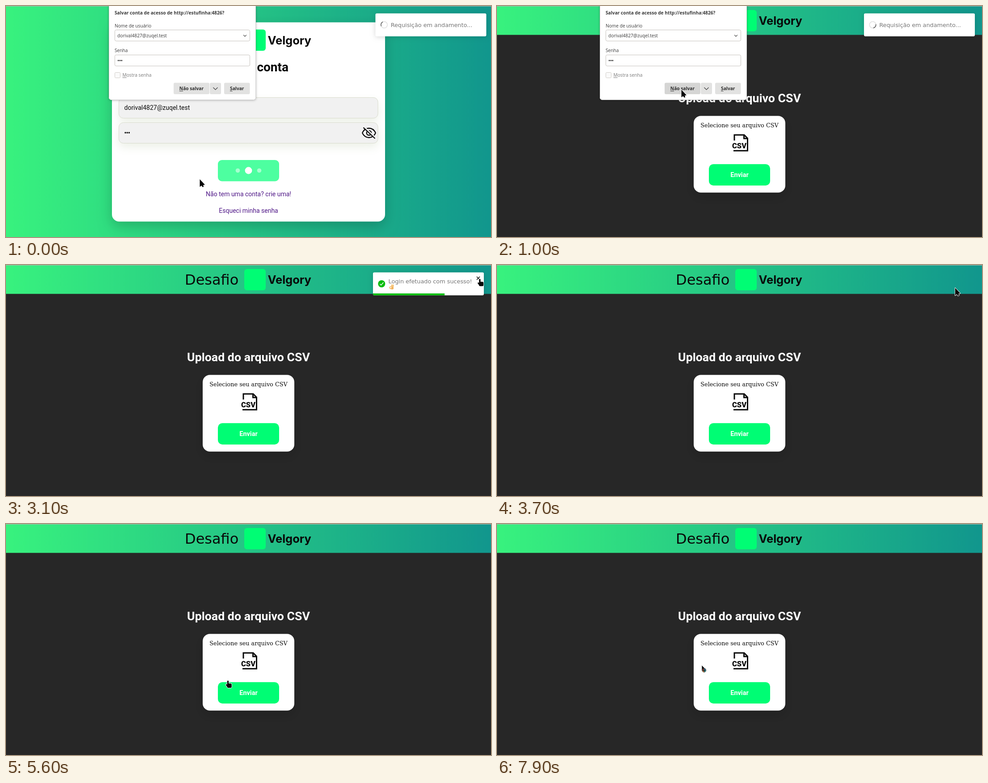
An HTML page with a canvas that plays this animation: 1085x516 px, repeating every 8000 ms.

```html
<!DOCTYPE html>
<html lang="pt-BR">
<head>
<meta charset="utf-8">
<title>Login e upload</title>
<style>
  html, body { margin: 0; width: 100%; height: 100%; overflow: hidden; background: #272727; }
  canvas { display: block; }
</style>
</head>
<body>
<canvas id="stage" width="1085" height="516"></canvas>
<script>
const ctx = document.getElementById('stage').getContext('2d');
const W = 1085, H = 516, MID = W / 2, LOOP = 8000;
const ROBOTO = 'Roboto, sans-serif';
const SANS = '12.8px "DejaVu Sans", sans-serif';
const UI = '10.2px "Open Sans", sans-serif', UI_BOLD = 'bold ' + UI;
const GREEN = '#00fd74', OK = '#07bc0c', INK = '#3a3a3a', BLACK = '#080808';
const EMAIL = 'dorival4827@zuqel.test';

const PAGE_AT = 950, DIALOG_END = 1200, SUCCESS_AT = 1320;
const HOVER_AT = 3090, CLOSE_AT = 3390, BUSY_AT = 7850;

// pointer moves: start time, end time, destination
const HOME = { x: 433, y: 387 };
const MOVES = [
  [200, 800, 412, 187],
  [1300, 1900, 494, 236],
  [1900, 2700, 1044, 95],
  [2700, 3080, 1054, 31],
  [3600, 4300, 529, 387],
  [4600, 5300, 470, 371],
  [5400, 5900, 528, 311],
  [6000, 6300, 476, 324],
  [6700, 7300, 458, 316]
];

const clamp = v => Math.max(0, Math.min(1, v));
const mix = (a, b, k) => a + (b - a) * k;
const smooth = k => k * k * (3 - 2 * k);

function pointerAt(t) {
  let { x, y } = HOME;
  for (const [from, to, endX, endY] of MOVES) {
    const k = smooth(clamp((t - from) / (to - from)));
    x = mix(x, endX, k);
    y = mix(y, endY, k);
  }
  return { x, y };
}

function box(x, y, w, h, r, fill, stroke) {
  ctx.beginPath();
  ctx.roundRect(x, y, w, h, r);
  if (fill) { ctx.fillStyle = fill; ctx.fill(); }
  if (stroke) { ctx.strokeStyle = stroke; ctx.lineWidth = 1; ctx.stroke(); }
}

function shadowBox(color, blur, dy, ...args) {
  ctx.save();
  ctx.shadowColor = color;
  ctx.shadowBlur = blur;
  ctx.shadowOffsetY = dy;
  box(...args);
  ctx.restore();
}

function text(str, x, y, font, color, align = 'left') {
  ctx.font = font;
  ctx.fillStyle = color;
  ctx.textAlign = align;
  ctx.fillText(str, x, y);
}

function dot(x, y, r, fill) {
  ctx.beginPath();
  ctx.arc(x, y, r, 0, 7);
  ctx.fillStyle = fill;
  ctx.fill();
}

function ring(x, y, r, color, width, from = 0, to = 7) {
  ctx.beginPath();
  ctx.arc(x, y, r, from, to);
  ctx.strokeStyle = color;
  ctx.lineWidth = width;
  ctx.stroke();
}

function line(color, width, ...p) {
  ctx.beginPath();
  for (let i = 0; i < p.length; i += 2) ctx.lineTo(p[i], p[i + 1]);
  ctx.strokeStyle = color;
  ctx.lineWidth = width;
  ctx.stroke();
}

function bullets(x, y, step, r, color) {
  for (let i = 0; i < 3; i++) dot(x + i * step, y, r, color);
}

function gradient(h) {
  const g = ctx.createLinearGradient(0, 0, W, 0);
  g.addColorStop(0, '#38f27e');
  g.addColorStop(1, '#11968d');
  ctx.fillStyle = g;
  ctx.fillRect(0, 0, W, h);
}

function brand(y) {
  text('Desafio', 400, y + 34.5, '32px "DejaVu Sans", sans-serif', BLACK);
  box(533, y, 48, 47.5, 6, GREEN);
  text('Velgory', 585.5, y + 33, 'bold 25.5px Inter, sans-serif', BLACK);
}

function eye(x, y) {
  ctx.save();
  ctx.translate(x, y);
  for (const side of [-1, 1]) {
    ctx.beginPath();
    ctx.moveTo(-15, 0);
    ctx.bezierCurveTo(-8, 14 * side, 8, 14 * side, 15, 0);
    ctx.strokeStyle = BLACK;
    ctx.lineWidth = 2.3;
    ctx.stroke();
  }
  ring(0, 0, 5.2, BLACK, 2.3);
  line('#f1f1f1', 2.6, -10.5, -13.5, 15, 11);
  line(BLACK, 2.3, -12.5, -12, 13.5, 12.5);
  ctx.restore();
}

function loginPage(t) {
  gradient(H);
  shadowBox('rgba(0,0,0,.2)', 30, 10, 237, 36.5, 611, 445, 16, '#fff');
  brand(52.5);
  text('conta', 632, 146, 'bold 28px ' + ROBOTO, BLACK, 'right');

  for (const y of [204.5, 260.5])
    shadowBox('rgba(110,140,70,.13)', 20, 9, 252.5, y, 579.5, 46, 10, '#f1f1f1');
  for (const y of [204.5, 260.5]) box(252.5, y, 579.5, 46, 10, '#f1f1f1', '#d9dccd');
  text(EMAIL, 264.5, 232, '14px ' + ROBOTO, BLACK);
  bullets(267, 283, 4.2, 1.7, BLACK);
  eye(812, 283.5);

  box(474, 344, 137, 47.5, 9, '#4dffa0');
  const beat = Math.abs((t / 400) % 2 - 1);
  for (let i = -1; i <= 1; i++) {
    const k = i ? 1 - beat : beat;
    dot(MID + i * 24, 367.5, mix(4.8, 7.9, k), `rgba(255,255,255,${mix(.5, 1, k)})`);
  }
  text('Não tem uma conta? crie uma!', MID, 425, '14px ' + ROBOTO, '#4f1787', 'center');
  text('Esqueci minha senha', MID, 462, '14px ' + ROBOTO, '#4f1787', 'center');
}

function csvIcon(x, y) {
  ctx.save();
  ctx.translate(x, y);
  line(BLACK, 3, 5, 14, 5, 1.5, 27, 1.5, 34.5, 9, 34.5, 36.7, 3, 36.7);
  line(BLACK, 3, 26.5, 1.5, 26.5, 9.5, 34.5, 9.5);
  text('CSV', 0, 31.5, '900 16.5px ' + ROBOTO, BLACK);
  ctx.restore();
}

function uploadPage() {
  ctx.fillStyle = '#272727';
  ctx.fillRect(0, 0, W, H);
  gradient(64.5);
  brand(9);
  text('Upload do arquivo CSV', MID, 214.5, 'bold 26.7px ' + ROBOTO, '#fff', 'center');
  shadowBox('rgba(0,0,0,.14)', 24, 10, 440, 245.5, 205, 171.3, 16, '#fff');
  text('Selecione seu arquivo CSV', MID, 271.3, '12.8px "DejaVu Serif", serif', BLACK, 'center');
  csvIcon(526, 286.5);
  box(474, 353.3, 137, 47.7, 10, GREEN);
  text('Enviar', MID, 382, 'bold 14.5px ' + ROBOTO, '#fff', 'center');
}

function spinner(t) {
  const a = (200 + t / 650 * 360) * Math.PI / 180;
  ring(840.5, 42, 7.2, '#e0e0e0', 1.6);
  ring(840.5, 42, 7.2, '#616161', 1.6, a - .8, a + .8);
}

function okHand(x, y) {
  for (let i = 0; i < 3; i++)
    line('#f5bd6b', 1.8, x + 2.5 + i * 1.4, y, x + 1.6 + i * 2.2, y - 7);
  box(x, y - 1, 6.2, 5, 2, '#f2b35c');
  ring(x, y, 2.3, '#f2b35c', 1.7);
  dot(x, y, 1.3, '#fff');
}

function successContent(t) {
  ctx.save();
  ctx.translate(840.3, 42);
  const s = mix(.3, 1, clamp((t - SUCCESS_AT) / 300));
  ctx.scale(s, s);
  dot(0, 0, 8, OK);
  line('#fff', 1.5, -3.8, .3, -1.2, 3, 4, -3);
  ctx.restore();

  text('Login efetuado com sucesso!', 855.5, 41, SANS, '#757575');
  okHand(860.8, 50.6);
  const cross = t > HOVER_AT - 40 ? '#111' : '#a5a5a5';
  for (const d of [-3.5, 3.5]) line(cross, 1.6, 1056.5 - d, 26, 1056.5 + d, 33);

  // the countdown stops while the pointer rests on the toast
  const left = 1 - (Math.min(t, HOVER_AT) - SUCCESS_AT) / 5000;
  ctx.fillStyle = OK;
  ctx.fillRect(821, 63.5, 248 * clamp(left), 4.5);
}

function toast(t) {
  const out = t - CLOSE_AT;
  if (out > 700) return;
  const settle = 5.5 * Math.cos(t / 90 * Math.PI) * clamp(1 - t / 200);
  const recoil = 20 * Math.sin(clamp(out / 140) * Math.PI / 2);
  const leave = smooth(clamp((out - 140) / 560));
  ctx.save();
  ctx.globalAlpha = 1 - leave;
  ctx.translate(settle - recoil + 2020 * leave, 0);
  shadowBox('rgba(0,0,0,.16)', 11, 1.5, 821, 16.5, 248, 51.3, 3, '#fff');
  ctx.beginPath();
  ctx.roundRect(821, 16.5, 248, 51.3, 3);
  ctx.clip();
  if (t < SUCCESS_AT) {
    spinner(t);
    text('Requisição em andamento...', 855.2, 47, SANS, '#757575');
  } else {
    successContent(t);
  }
  ctx.restore();
}

// text whose first letter is underlined as its shortcut
function mnemonic(str, x, y, font, color) {
  text(str, x, y, font, color);
  line(color, 1, x, y + 2, x + ctx.measureText(str[0]).width, y + 2);
}

function button(label, x, w, fill) {
  box(x, 171.5, w, 25.5, 3, fill);
  ctx.font = UI_BOLD;
  mnemonic(label, x + (w - ctx.measureText(label).width) / 2, 188, UI_BOLD, '#2e2e2e');
}

function field(label, y) {
  text(label, 243, y - 6, UI, INK);
  box(243.5, y, 302, 24.7, 3, '#fff', '#c5c1bc');
}

function chevron(x, y, r) {
  line(INK, 1.1, x - r, y - r / 2, x, y + r / 2, x + r, y - r / 2);
}

function dialog({ x, y }) {
  shadowBox('rgba(0,0,0,.3)', 5, 1, 230, -6, 329, 215.5, 5, '#fff');
  box(230.5, -6, 328, 215.5, 5, '#fff', '#d4d4d4');
  text('Salvar conta de acesso de http://estufinha:4826?', 243, 19, UI_BOLD, INK);
  field('Nome de usuário', 53.5);
  text(EMAIL, 249, 70, UI, INK);
  chevron(534.5, 66.3, 3.3);
  field('Senha', 109.3);
  bullets(251.2, 121.7, 3.8, 1.5, INK);
  box(243.5, 148.5, 12, 12, 2, '#fafafa', '#d0ccc7');
  mnemonic('Mostra senha', 260.5, 158, UI, '#777');

  const hover = x > 375 && x < 455 && y > 171 && y < 197;
  button('Não salvar', 375, 80, hover ? '#d5d5d4' : '#e2e2e1');
  box(456, 171.5, 25, 25.5, 3, '#e2e2e1');
  chevron(468.5, 184.5, 5);
  button('Salvar', 488, 57.5, '#e2e2e1');
}

function outlined(path) {
  ctx.lineJoin = 'round';
  ctx.strokeStyle = '#fff';
  ctx.lineWidth = 1.8;
  ctx.stroke(path);
  ctx.fillStyle = BLACK;
  ctx.fill(path);
}

function arrow(scale) {
  ctx.save();
  ctx.scale(scale, scale);
  outlined(new Path2D('M.5 0 V17 L4.3 14.2 L7 17.8 L9.3 16.6 L8 13 L12 12.2 Z'));
  ctx.restore();
}

function hand() {
  const path = new Path2D();
  path.roundRect(4.2, 0, 3.4, 11, 1.7);
  path.roundRect(4.2, 6.5, 10, 9.8, 2.5);
  path.addPath(new Path2D('M.7 9 L3 8 L7 11 V16 L5.5 16 Z'));
  outlined(path);
}

function busy() {
  arrow(.68);
  dot(5.3, 10.8, 4.7, '#1c2b30');
  ['#3fa7a0', '#e8873a', '#b5452f', '#4b86a8'].forEach((color, i) =>
    ring(5.3, 10.8, 3, color, 1.7, i * 1.57, i * 1.57 + 1.3));
}

function cursor(t, { x, y }) {
  const onCard = t > DIALOG_END && x > 440 && x < 645 && y > 245 && y < 416;
  const onToast = x > 821 && y < 64 && t < CLOSE_AT + 300;
  ctx.save();
  ctx.translate(x, y);
  if (t > BUSY_AT) busy();
  else if (onCard || onToast) hand();
  else arrow(1);
  ctx.restore();
}

function draw(t) {
  const pointer = pointerAt(t);
  if (t < PAGE_AT) loginPage(t);
  else uploadPage();
  ctx.fillStyle = '#a9b8b0';
  ctx.fillRect(0, 0, W, 1);
  toast(t);
  if (t < DIALOG_END) dialog(pointer);
  cursor(t, pointer);
}

const start = performance.now();
function tick() {
  draw((performance.now() - start) % LOOP);
  requestAnimationFrame(tick);
}
tick();
</script>
</body>
</html>
```
